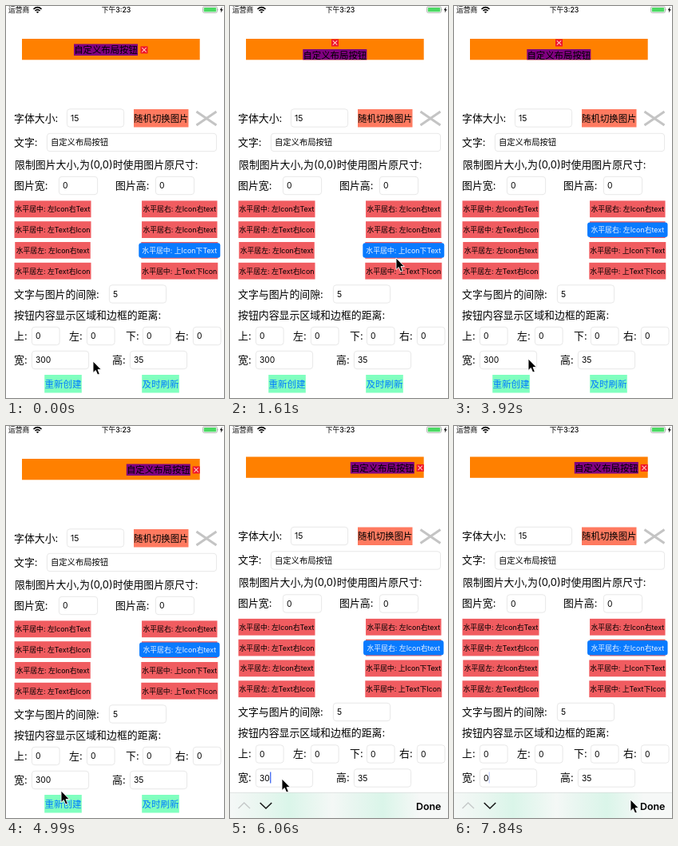
Animation of 273 by 490 pixels, one loop 8 s. Source, as an HTML page:

```html
<!DOCTYPE html>
<html lang="zh-CN">
<head>
<meta charset="utf-8">
<style>
html, body { margin: 0; width: 100%; height: 100%; overflow: hidden; background: #fff; }
svg { display: block; width: 100%; height: 100%; }
text { font-family: Inter, "Noto Sans CJK SC", "Noto Sans CJK", sans-serif; white-space: pre; }
</style>
</head>
<body>
<svg id="stage" viewBox="0 0 273 490">
  <defs>
    <linearGradient id="mint">
      <stop stop-color="#f5f8f7"/><stop offset=".14" stop-color="#e9f6f0"/><stop offset=".27" stop-color="#daf5e9"/>
      <stop offset=".47" stop-color="#f4f8f6"/><stop offset=".55" stop-color="#eaf6f1"/><stop offset=".7" stop-color="#daf5e9"/>
      <stop offset=".87" stop-color="#f6f8f7"/>
    </linearGradient>
  </defs>
  <g id="page"></g>
  <g id="status">
    <path d="M34.5 3.8Q39.5 -.4 44.5 3.8M36.4 6Q39.5 3.4 42.6 6" fill="none" stroke="#000" stroke-width="1.6"/>
    <path d="M37.7 7.3Q39.5 6 41.3 7.3L39.5 9Z"/>
    <rect x="246.5" y=".8" width="18" height="7.6" rx="1.8" fill="none" stroke="#999" stroke-width=".7"/>
    <rect x="247.7" y="2" width="15.6" height="5.2" rx=".8" fill="#4cd964"/>
    <path d="M265.3 3.3q1.3 1.3 0 2.6z" fill="#999"/>
    <path d="M270.6 1L267.8 5.2H269.6L268.8 8.6L271.8 4.2H270Z"/>
  </g>
  <g id="bar">
    <rect width="273" height="34" fill="url(#mint)"/>
    <path d="M0 .3H273" stroke="#d0d2d2" stroke-width=".6"/>
    <path d="M10.5 20L17.7 13L25 20" fill="none" stroke="#c4c8c8" stroke-width="1.3"/>
    <path d="M37.7 13L45 20L52.2 13" fill="none" stroke="#111" stroke-width="1.5"/>
  </g>
  <path id="mouse" d="M0 0V14.5L3.3 11.5L5.7 17L8.3 16L6 10.6H10.3Z" stroke="#fff" stroke-width=".9"/>
</svg>
<script>
const $ = id => document.getElementById(id);
const page = $('page');

function add(parent, tag, attrs, content = '') {
  const el = document.createElementNS('http://www.w3.org/2000/svg', tag);
  for (const k in attrs) el.setAttribute(k, attrs[k]);
  el.textContent = content;
  return parent.appendChild(el);
}
const rect = (x, y, width, height, fill, more, parent = page) =>
  add(parent, 'rect', { x, y, width, height, fill, ...more });
// y is the vertical middle of the line
const text = (s, x, y, size, more, parent = page) =>
  add(parent, 'text', { x, y: y + size * .37, 'font-size': size, ...more }, s);
const middle = { 'text-anchor': 'middle' };
const move = (el, x, y) => el.setAttribute('transform', `translate(${x} ${y})`);

function field(x, y, w, value) {
  rect(x + .4, y - 11.2, w - .8, 22.4, '#fff', { rx: 3.6, stroke: '#dfdfdf', 'stroke-width': .7 });
  return text(value, x + 5, y, 10.3);
}

// Preview button
rect(20, 41, 222.7, 26.3, '#ff8000');
const title = add(page, 'g', {});
const titleBack = rect(0, 0, 80, 14.5, '#800080', {}, title);
text('自定义布局按钮', 40, 7.4, 11.4, middle, title);
const icon = add(page, 'g', {});
rect(0, 0, 9, 9, '#f0142a', {}, icon);
add(icon, 'path', { d: 'M1.8 1.8L7.2 7.2M7.2 1.8L1.8 7.2', stroke: '#ffc4c0', 'stroke-width': 1.1 });

// Labels and fields
[['字体大小:', 10, 140], ['文字:', 10, 170], ['限制图片大小,为(0,0)时使用图片原尺寸:', 11, 198],
 ['图片宽:', 10, 224], ['图片高:', 137, 224], ['文字与图片的间隙:', 10, 360],
 ['按钮内容显示区域和边框的距离:', 10, 386], ['上:', 10, 412], ['左:', 79, 412],
 ['下:', 150, 412], ['右:', 212, 412], ['宽:', 10, 442], ['高:', 133, 442]
].forEach(([s, x, y]) => text(s, x, y, 12.9));

[[76, 140, 72, '15'], [51, 170.5, 213, '自定义布局按钮'], [66, 224.5, 49, '0'], [187, 224.5, 49, '0'],
 [129, 360, 72, '5'], [155, 442.5, 72, '35']].forEach(f => field(...f));
[32, 101, 171, 234].forEach(x => field(x, 412.5, 35.5, '0'));
const widthText = field(32, 442.5, 72, '300');
const caret = rect(0, 435, 1.4, 14, '#4a6ff0');

rect(160, 129, 68.5, 22.5, '#ff7a60');
text('随机切换图片', 194.3, 140.3, 11.4, middle);
add(page, 'path', { d: 'M238.5 132L263.5 149M263.5 132L238.5 149', stroke: '#c4c4c4', 'stroke-width': 3 });

// Layout choices: the picked one turns blue
const choices = [];
[['居中: 左Icon右Text', '居中: 左Text右Icon', '居左: 左Icon右text', '居左: 左Text右Icon'],
 ['居右: 左Icon右text', '居右: 左Icon右text', '居中: 上Icon下Text', '居中: 上Text下Icon']
].forEach((column, c) => column.forEach((s, r) => {
  const x = c ? 217.3 : 58.5, y = 253.8 + r * 25.8;
  const w = s.endsWith('text') ? 94.5 : 96;
  rect(x - w / 2, y - 10.4, w, 20.8, '#f05c60');
  const blue = rect(x - w / 2 - 3, y - 9.2, w + 6, 18.6, '#087aff', { rx: 3 });
  const label = text('水平' + s, x, y + .2, 8.85, middle);
  choices.push({ blue, label });
}));

const actions = ['重新创建', '及时刷新'].map((s, i) => {
  const x = 71.5 + i * 122;
  rect(x - 23.3, 461, 46.6, 22.5, '#80ffbf');
  return text(s, x, 472.3, 11.5, { ...middle, fill: '#007aff' });
});

text('运营商', 3, 5.2, 8.8, {}, $('status'));
text('下午3:23', 138, 5.2, 8.8, { ...middle, 'font-weight': 500 }, $('status'));
text('Done', 233, 17, 12.4, { 'font-weight': 600 }, $('bar'));

// Pointer path: step, x, y
const path = [[0, 109, 444], [2, 76, 466], [4, 74, 467], [5, 85, 455], [7, 150, 385], [9, 208, 315],
  [10, 210, 308], [12, 185, 280], [14, 170, 272], [17, 167, 269], [19, 174, 277], [20, 160, 300],
  [22, 93, 441], [24, 72, 466], [27, 72, 466], [29, 66, 446], [31, 65, 441], [32, 65, 441],
  [34, 65, 441], [40, 65, 441], [43, 215, 465], [44, 221, 467]];

function pointer(n) {
  const i = Math.max(1, path.findIndex(p => p[0] >= n));
  const [a, ax, ay] = path[i - 1], [b, bx, by] = path[i];
  const k = (n - a) / (b - a);
  return [ax + (bx - ax) * k, ay + (by - ay) * k];
}

// Latest value whose start step has been reached
const at = (n, list) => list.filter(e => n >= e[0]).pop()[1];

// Title x, y, height and icon x, y
const layouts = [[0, [85, 47.5, 14.5, 168.5, 50.4]], [3, [91.3, 54, 13.3, 127, 41.5]], [26, [150.8, 47.5, 14.5, 233.7, 50.4]]];

function draw(n) {
  const [tx, ty, th, ix, iy] = at(n, layouts);
  move(title, tx, ty);
  titleBack.setAttribute('height', th);
  move(icon, ix, iy);

  const picked = n < 19 ? 6 : 5;
  choices.forEach(({ blue, label }, i) => {
    blue.setAttribute('visibility', i === picked ? 'visible' : 'hidden');
    label.setAttribute('fill', i === picked ? '#e8f2ff' : '#000');
  });
  actions[0].setAttribute('opacity', n === 3 || n === 26 ? .3 : 1);

  const value = at(n, [[0, '300'], [34, '30'], [35, '3'], [36, ''], [41, '0']]);
  widthText.textContent = value;
  caret.setAttribute('x', 37 + value.length * 6.5);
  caret.setAttribute('opacity', n < 32 ? 0 : n === 44 ? .3 : 1);

  move(page, 0, at(n, [[0, 0], [33, -1.2], [34, -2.5]]));
  move($('bar'), 0, at(n, [[0, 500], [32, 488], [33, 470], [34, 458]]));
  move($('mouse'), ...pointer(n));
}

function tick() {
  draw(Math.min(44, Math.floor(performance.now() % 8000 / 178)));
  requestAnimationFrame(tick);
}
tick();
</script>
</body>
</html>
```
